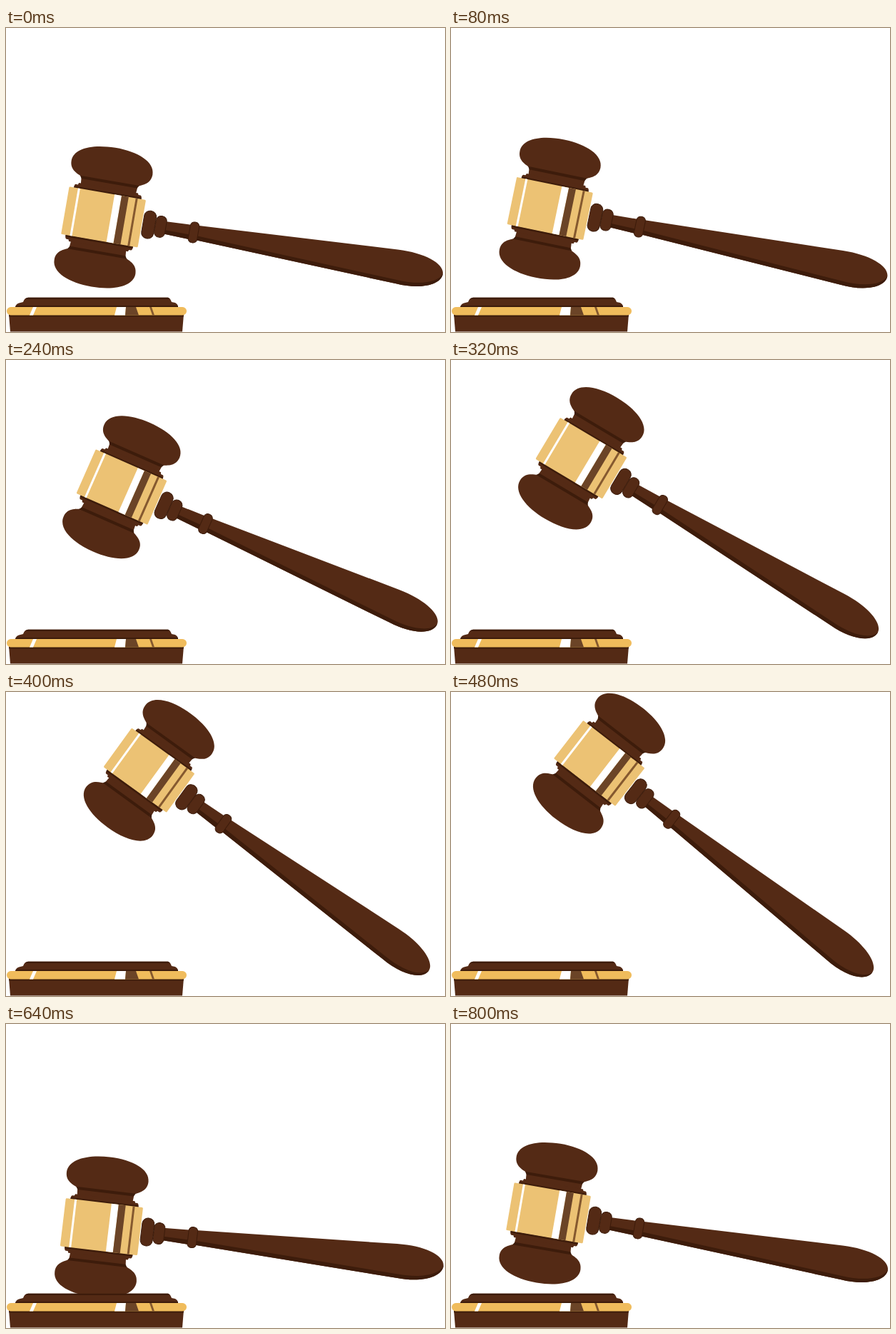
Recreate the animation shown at these times as an HTML page. Size 615 by 426 pixels, loop 2.88 s.

```html
<!DOCTYPE html>
<html lang="en">
<head>
<meta charset="utf-8">
<title>Gavel</title>
<style>
  html, body { margin: 0; width: 100%; height: 100%; overflow: hidden; background: #fff; }
  svg { display: block; width: 615px; height: 426px; }
  .wood { fill: #542a15; }
  .dark { fill: #3d1c0b; }
  .gold { fill: #ecc274; }
  .rim { fill: #f0bc5c; }
  .tan { fill: #6b4427; }
  .thin { fill: #85592f; }
  .white { fill: #fff; }
  .ring { fill: #542a15; stroke: #3d1c0b; }
</style>
</head>
<body>
<svg viewBox="0 0 615 426">
  <defs>
    <!-- Upper half of the head, centred on x = 0 -->
    <g id="cap">
      <path class="wood" d="M-40-50C-43-53-57.700-55-57.700-70C-57.700-88-32-98.200 0-98.200S57.700-88 57.700-70C57.700-55 43-53 40-50L39-38H-39Z"/>
      <path class="dark" d="M-42-51.500H42L39.500-47.500H-39.500Z"/>
      <path class="wood" d="M-42-41H42L43-38.500H46Q48-38 48-33H-48Q-48-38-46-38.500H-43Z"/>
      <path class="dark" d="M-47.500-35.500H47.500L48-32.500H-48Z"/>
    </g>
  </defs>

  <!-- Gavel: drawn level, placed at rest by the inner group, swung by the outer one -->
  <g id="gavel">
    <g transform="translate(515 330) rotate(9.8)">
      <path class="wood" d="M-298-8.500L-260-10V10.500L-298 9Z"/>
      <path class="dark" d="M-298 3.500L-260 4V10.500L-298 9Z"/>
      <path class="wood" d="M-252-10.500L30-25C70-27 98-16 98-2C98 14 70 25 36 22.500L-252 10Z"/>
      <path class="dark" d="M-252 4L36 17C66 19 94 12 98-3C99 14 70 25 36 22.500L-252 10Z"/>
      <rect class="ring" x="-328" y="-19.500" width="17" height="39" rx="8"/>
      <rect class="ring" x="-310.500" y="-15" width="15" height="30" rx="7"/>
      <rect class="ring" x="-262" y="-14.500" width="12.500" height="29" rx="5.500"/>
      <g transform="translate(-384)">
        <use href="#cap"/>
        <use href="#cap" transform="translate(0 1) scale(1 -1)"/>
        <rect class="gold" x="-54.500" y="-33.500" width="109" height="67.500" rx="1.500"/>
        <rect class="white" x="-42" y="-33.500" width="3" height="67.500"/>
        <rect class="white" x="10" y="-33.500" width="10" height="67.500"/>
        <rect class="tan" x="20" y="-33.500" width="10" height="67.500"/>
        <rect class="thin" x="40" y="-33.500" width="3" height="67.500"/>
      </g>
    </g>
  </g>

  <!-- Sound block -->
  <path class="wood" d="M13 391Q14 386 20 385L24 384Q26 377.700 31 377.700H227Q230 378 232 384L237 385Q241 387 241 391Z"/>
  <path class="dark" d="M27 380Q29 377.700 31 377.700H227L229 380ZM14 389H241V391H13Z"/>
  <path class="wood" d="M4 401H249L247 425.500H6Z"/>
  <path class="dark" d="M4 401H249L248.700 404.500H4.300Z"/>
  <rect class="rim" x="1" y="391" width="252" height="11.500" rx="5.700"/>
  <path class="white" d="M38 391H43L38 402.500H33ZM155 391H168L167 402.500H152Z"/>
  <path class="tan" d="M168 391H182L186 402.500H167Z"/>
  <path class="thin" d="M201 391H204L208 402.500H205Z"/>
</svg>
<script>
  const LOOP = 2880, STEP = 40;
  // [time in ms, swing from rest in degrees]
  const poses = [[0, 0], [480, 28], [640, -3], [800, 0], [LOOP, 0]];
  const gavel = document.getElementById('gavel');

  function swing(t) {
    const i = poses.findIndex(([time]) => t < time);
    const [t0, a0] = poses[i - 1], [t1, a1] = poses[i];
    const ease = (1 - Math.cos(Math.PI * (t - t0) / (t1 - t0))) / 2;
    return a0 + (a1 - a0) * ease;
  }

  const start = performance.now();
  function draw() {
    const t = (performance.now() - start) % LOOP;
    const angle = swing(Math.floor(t / STEP) * STEP);
    gavel.setAttribute('transform', `rotate(${angle} 503 325)`);
    requestAnimationFrame(draw);
  }
  draw();
</script>
</body>
</html>
```
